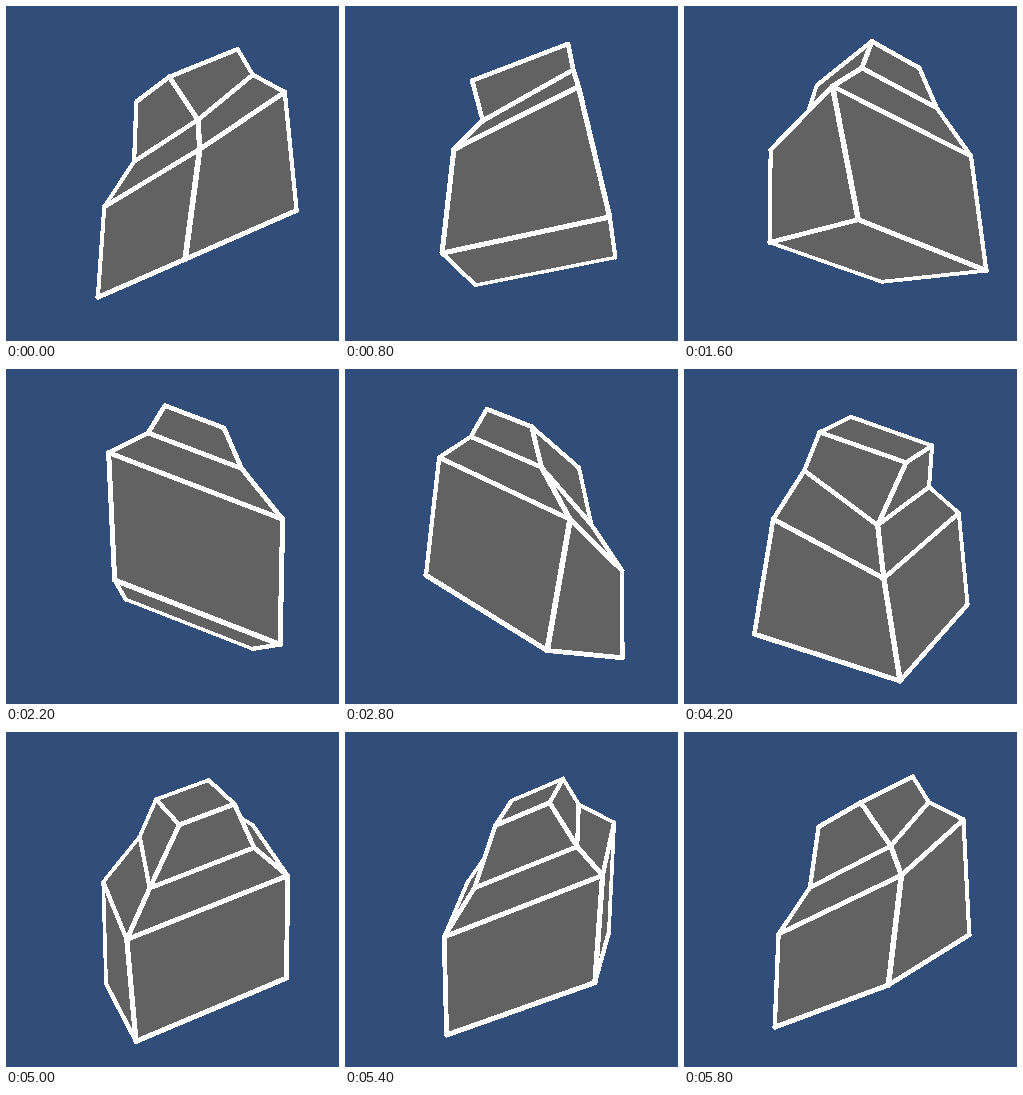
These frames come from a looping animation (333x335 px, 6 s). An HTML page:

```html
<!DOCTYPE html>
<html lang="en">
<head>
<meta charset="utf-8">
<title>Rotating solid</title>
<style>
  html, body { margin: 0; width: 100%; height: 100%; overflow: hidden; background: #314d79; }
  svg { display: block; width: 100%; height: 100%; shape-rendering: crispEdges; }
  polygon { fill: #626262; }
  line { stroke: #fff; stroke-linecap: round; }
</style>
</head>
<body>
<svg viewBox="0 0 333 335"><g id="solid"></g></svg>
<script>
const LOOP = 6000, STEP = 200;
const CENTER = { x: 186.2, y: 148 }, DISTANCE = 745, LINE = 4.2;

// A unit vector [x, depth, y] from its compass heading and its pitch.
function direction(heading, pitch) {
  const h = heading * Math.PI / 180, p = pitch * Math.PI / 180;
  return [Math.cos(p) * Math.cos(h), Math.cos(p) * Math.sin(h), Math.sin(p)];
}
const across = pitch => direction(135, pitch);
const along = direction(50.4, -21);

// The solid is a stack of four tilted trapezoids threaded on the vertical axis.
const rings = [
  { y: 101, shift: -5, pitch: 12, width: 156, left: 158, right: 149 },
  { y: -2, shift: 2.5, pitch: 25.5, width: 125, left: 173, right: 162 },
  { y: -37, shift: -4, pitch: 31, width: 98, left: 94, right: 108 },
  { y: -78, shift: 7, pitch: 20, width: 99, left: 60, right: 56 }
];

function ringCorners({ y, shift, pitch, width, left, right }) {
  const middle = across(0).map(v => v * shift);
  middle[2] += y;
  const corner = (side, end) => {
    const length = side < 0 ? left : right;
    return middle.map((m, i) =>
      m + side * width / 2 * across(pitch)[i] + end * length / 2 * along[i]);
  };
  return [corner(-1, -1), corner(1, -1), corner(1, 1), corner(-1, 1)];
}
const corners = rings.flatMap(ringCorners);

const cap = level => [0, 1, 2, 3].map(i => level * 4 + i);
const sides = level => cap(level).map((low, i) => {
  const next = cap(level)[(i + 1) % 4];
  return [low, next, next + 4, low + 4];
});
const layers = [[cap(0).reverse(), ...sides(0)], sides(1), [...sides(2), cap(3)]];

function project([x, depth, y], cos, sin) {
  const scale = 1 / (1 - (x * sin + depth * cos) / DISTANCE);
  return {
    x: CENTER.x + (x * cos - depth * sin) * scale,
    y: CENTER.y + y * scale,
    scale
  };
}

function facesViewer([a, b, c, d]) {
  return (c.x - a.x) * (d.y - b.y) - (c.y - a.y) * (d.x - b.x) < 0;
}

// Lines grow thicker towards the viewer.
function drawEdge(a, b) {
  const width = LINE * a.scale * b.scale;
  return `<line x1="${a.x}" y1="${a.y}" x2="${b.x}" y2="${b.y}" stroke-width="${width}"/>`;
}

function drawFace(face) {
  const outline = face.map(p => `${p.x},${p.y}`).join(" ");
  return `<polygon points="${outline}"/>` +
    face.map((p, i) => drawEdge(p, face[(i + 1) % 4])).join("");
}

const solid = document.getElementById("solid");

function render(time) {
  const angle = Math.floor(time % LOOP / STEP) * STEP / LOOP * 2 * Math.PI;
  const points = corners.map(c => project(c, Math.cos(angle), Math.sin(angle)));
  const place = face => face.map(i => points[i]);

  // Seen from above, the upper layers cover the lower ones.
  const order = facesViewer(place(cap(2))) ? layers : [...layers].reverse();
  solid.innerHTML = order.flat().map(place).filter(facesViewer).map(drawFace).join("");
}

const start = performance.now();
function tick() {
  render(performance.now() - start);
  requestAnimationFrame(tick);
}
tick();
</script>
</body>
</html>
```
